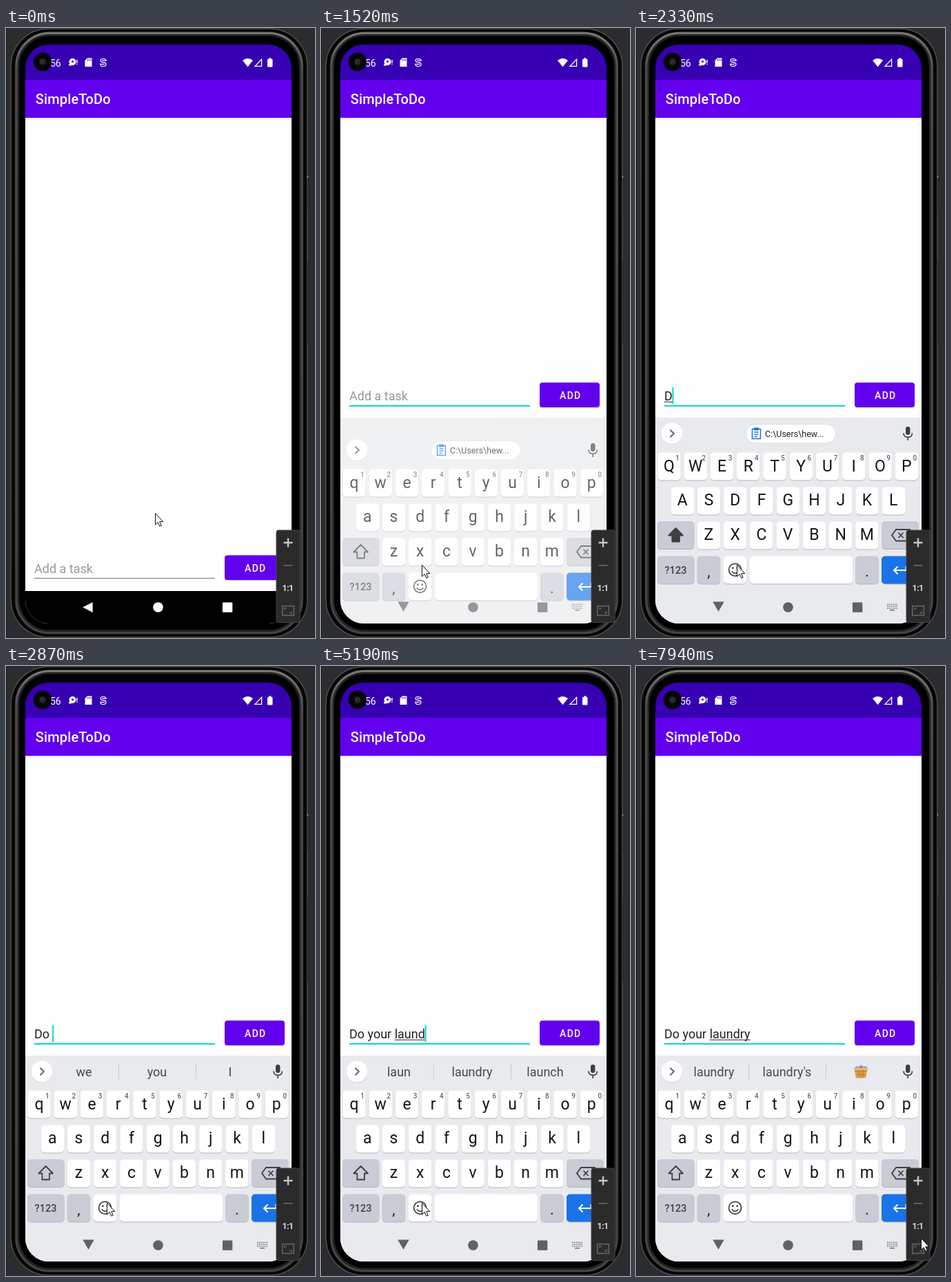
Recreate the animation shown at these times as an HTML page. Size 448 by 883 pixels, loop 8000 ms.

```html
<!DOCTYPE html>
<html lang="en">
<head>
<meta charset="utf-8">
<title>SimpleToDo</title>
<style>
html, body { margin: 0; width: 100%; height: 100%; overflow: hidden; background: #2b2c2f; }
svg { display: block; width: 448px; height: 883px; }
text { font-family: Roboto, sans-serif; white-space: pre; }
.mid { text-anchor: middle; }
</style>
</head>
<body>
<svg id="stage" viewBox="0 0 448 883" xmlns="http://www.w3.org/2000/svg"></svg>
<script>
const LOOP = 8000;
const stage = document.getElementById('stage');
const rect = (x, y, w, h, fill, r = 0, more = '') =>
  `<rect x="${x}" y="${y}" width="${w}" height="${h}" rx="${r}" fill="${fill}" ${more}/>`;
const circle = (x, y, r, fill, more = '') => `<circle cx="${x}" cy="${y}" r="${r}" fill="${fill}" ${more}/>`;
const path = (d, fill, more = '') => `<path d="${d}" fill="${fill}" ${more}/>`;
const line = (d, color, w = 1.6, more = '') => path(d, 'none', `stroke="${color}" stroke-width="${w}" ${more}`);
const label = (x, y, size, fill, s, more = '') =>
  `<text x="${x}" y="${y}" font-size="${size}" fill="${fill}" ${more}>${s}</text>`;
const center = (x, y, size, fill, s, more = '') => label(x, y, size, fill, s, 'class="mid" ' + more);
const group = (id, body, more = '') => `<g id="${id}" ${more}>${body}</g>`;

function phone() {
  const ring = (x, y, r, fill, stroke, w = 1) =>
    rect(x, y, 444 - 2 * x, 883 - 2 * y, fill, r, `stroke="${stroke}" stroke-width="${w}"`);
  return rect(0, 0, 448, 883, '#2b2c2f') + rect(0, 0, 1, 883, '#1d1e20') +
    rect(434, 213, 4, 57, '#161616', 1) + rect(436, 214, 2, 3, '#d0d0d0') +
    rect(434, 335, 4, 122, '#0a0a0a', 1) +
    ring(7.2, 1.2, 54, '#060606', '#565656', 1.2) +
    ring(15, 7.5, 48, '#000', 'url(#metal)', 3.6) +
    ring(18, 10.5, 45, '#000', '#242424', 2.4);
}

function statusBar() {
  const w = '#fff';
  return rect(28, 24, 386, 51, '#3700b3') +
    label(64, 55.5, 14, w, '56') +
    circle(53, 49, 13.3, '#050505') + circle(53, 49, 6, '#121213') +
    circle(53, 49, 3, '#0c0d10', 'stroke="#4c4e52" stroke-width="1"') + circle(52.6, 48.6, 0.9, '#888') +
    circle(96.5, 49, 5, w) + circle(96.5, 48.5, 1.6, '#3700b3') + rect(91, 52, 4, 2.4, w, 1) +
    rect(102.3, 46, 1.4, 4.6, w) + rect(102.3, 51.6, 1.4, 1.4, w) +
    path('M118 43.5H124.5V56H114.5V47Z', w) + line('M118.5 45v2.5M120.7 45v2.5M122.8 45v2.5', '#3700b3', 0.9) +
    line('M145 47Q145 44.5 141 44.5T137 47Q137 49.5 141 49.7T145 52.5Q145 55.5 141 55.5T137 53M139 47.2H146M136 52.4H143', w, 1.2) +
    path('M343 47Q350.5 41 358 47L350.5 56.3Z', w) +
    line('M361 55.4H370.6V45.4Z', w, 1.3) +
    rect(379, 45, 7.5, 11.5, w, 1) + rect(381, 43.5, 3.5, 2.5, w);
}

function toolbar() {
  return rect(392, 727, 34, 133.5, '#2b2b2b', 3, 'stroke="#444" stroke-width="1"') +
    line('M402.5 745H415.5M409 738.5V751.5', '#c4c6c8', 2.4) +
    line('M402.5 778H415.5', '#5c5e60', 2) +
    center(408.4, 814.6, 13, '#d0d2d4', '1:1', 'font-weight="700" letter-spacing="-.7"') +
    rect(400.7, 836.7, 16.6, 13.6, 'none', 0, 'stroke="#626466" stroke-width="1.6"') +
    line('M404 842.5V840H407M411 847H414V844.5', '#626466', 1.4);
}

function keyboardIcon(color) {
  let s = '';
  for (let r = 0; r < 3; r++)
    for (let c = 0; c < 6; c++) s += rect(364 + c * 2.7, 833.7 + r * 2.8, 1.4, 1.4, color);
  return s + rect(368, 842, 7, 1.3, color);
}

const navShapes = c => circle(220.5, 838.5, 7.3, c) + rect(313.9, 831.4, 14.4, 14.4, c, 1);
const key = (x, y, w, fill = '#fff') => rect(x, y + 1, w, 40, '#b3b6bb', 5) + rect(x, y, w, 40, fill, 5);

function keys() {
  const gray = '#c9ccd4', ink = '#3c4043', step = 38.25;
  let caps = '', s = '';
  [['qwertyuiop', 48], ['asdfghjkl', 67.3], ['zxcvbnm', 105.4]].forEach(([row, x0], r) => {
    [...row].forEach((ch, i) => {
      const x = x0 + i * step;
      caps += key(x - 16.7, 614.5 + r * 50, 33.4) + center(x, 641.6 + r * 49.7, 23, '#151515', ch);
      if (!r) s += center(x + 12, 625.5, 10, '#5f6368', (i + 1) % 10, 'font-weight="500"');
    });
  });
  return group('caps', caps) + s +
    key(31, 714, 53.5, gray) + key(356, 714, 54, gray) +
    path('M57.7 724L68 734.5H63V743.5H52.4V734.5H47.4Z', 'none', 'id="shift" stroke="#3c4043" stroke-width="1.8" stroke-linejoin="round"') +
    line('M377 726H397V742.5H377L371 734.2ZM380.5 730.5L387.5 738M387.5 730.5L380.5 738', ink, 1.8) +
    key(31, 764.5, 53.5, gray) + key(88.8, 764.5, 33.4, gray) + key(127, 764.5, 33.4) +
    key(165, 764.5, 149, '#fff') + key(318.3, 764.5, 33.4, gray) + key(356, 764.5, 54, '#1a73e8') +
    center(57.5, 790, 14.5, ink, '?123', 'font-weight="500"') +
    center(105.5, 794, 22, '#222', ',') + center(335, 794, 22, '#222', '.') +
    circle(143.6, 784.3, 9, 'none', 'stroke="#3c4043" stroke-width="1.7"') +
    circle(140.4, 781.7, 1.4, ink) + circle(146.8, 781.7, 1.4, ink) +
    line('M139 786.3Q140.3 789.4 143.6 789.4T148.2 786.3', ink, 1.6) +
    line('M391.5 779V785H374.5M379.5 779.5L374 785L379.5 790.5', '#fff', 2);
}

const clipboard = (x, y, c) =>
  line(`M${x - 6} ${y - 6.5}H${x + 6}V${y + 7.5}H${x - 6}ZM${x - 3} ${y - 2}H${x + 3}M${x - 3} ${y + 1.2}H${x + 3}M${x - 3} ${y + 4.4}H${x + 1}`, c, 1.5) +
  rect(x - 3.5, y - 8.5, 7, 4, c, 1);

function gear(x, y, c) {
  let s = '';
  for (let i = 0; i < 4; i++) s += rect(x - 2.2, y - 8.6, 4.4, 17.2, c, 0.8, `transform="rotate(${i * 45} ${x} ${y})"`);
  return s + circle(x, y, 6.4, c) + circle(x, y, 2.9, '#e8eaed');
}

function basket() {
  return path('M317 583Q318 577 323 580Q327 575 330 580Q335 577 335 583Z', '#7fb4dd') +
    path('M323 581Q326 576 330 583Z', '#e9655b') +
    path('M316.5 583H335.5L333 596.5H319Z', '#e7a24c') +
    line('M317 587H335M318 591.5H334M322 584L323 596M326 584V596M330 584L329 596', '#b87630', 1) +
    rect(315.5, 582, 21, 2.6, '#f1bd70', 1);
}

function strip() {
  const c = '#5f6368', divider = x => rect(x, 576, 1, 22, '#c6c8cc');
  const dots = [331.5, 338.5, 345.5].map(x => circle(x, 587, 2, c)).join('');
  return circle(52, 588, 15.6, '#cfd1d5') + circle(52, 587, 15.4, '#fff') +
    line('M49.5 581.8L55 587L49.5 592.2', c, 1.9, 'id="chevron"') +
    rect(391, 577, 6.4, 12, '#3c4043', 3.2) + line('M388 586.5Q388 592.3 394.2 592.3T400.4 586.5M394.2 592V597', '#3c4043', 1.7) +
    group('chip', rect(159.5, 573.5, 130, 27.5, '#fff', 13.7, 'stroke="#dadce0"') +
      clipboard(174.5, 587, '#1a73e8') + label(187, 591.6, 12.5, '#222', 'C:\\Users\\hew...')) +
    group('words', divider(163) + divider(275) +
      [113, 219, 325].map((x, i) => center(x, 594, 18, '#46494d', '', `id="word${i}"`)).join('')) +
    group('basket', basket()) +
    group('tools', line('M97 579.5H107Q110 579.5 110 582.5V589L104.5 594.5H97Q94.5 594.5 94.5 592V582Q94.5 579.5 97 579.5ZM110 589H104.5V594.5', c, 1.6) +
      circle(99.5, 584.5, 1.2, c) + circle(105, 584.5, 1.2, c) + line('M98.5 588Q102 591.5 105.5 588', c, 1.4) +
      center(157.5, 591.8, 14, c, 'GIF', 'font-weight="800" letter-spacing=".4"') +
      clipboard(214, 587, c) + gear(270, 587, c) + divider(303) + dots);
}

function row() {
  return rect(317, 514.5, 87, 36, '#bbb', 4, 'opacity=".6"') + rect(317, 513.2, 87, 35.8, '#6200ee', 4) +
    center(361.8, 537, 14, '#fff', 'ADD', 'font-weight="500" letter-spacing="1.25"') +
    rect(41, 546, 262, 1, '#777', 0, 'id="base"') +
    label(41, 539, 18, '#222', '', 'id="entry"') +
    rect(0, 540.7, 0, 1, '#222', 0, 'id="under"') + rect(41, 520, 2, 24, '#03dac5', 0, 'id="caret"');
}

stage.innerHTML =
  `<defs><clipPath id="screen"><rect x="28" y="24" width="386" height="838" rx="34"/></clipPath>
  <linearGradient id="metal" x2="0" y2="1"><stop stop-color="#777"/><stop offset=".06" stop-color="#4c4c4c"/><stop offset="1" stop-color="#444"/></linearGradient>
  <linearGradient id="drop" x2="0" y2="1"><stop stop-color="#000" stop-opacity=".1"/><stop offset="1" stop-color="#000" stop-opacity="0"/></linearGradient></defs>` +
  phone() +
  group('app', statusBar() + rect(28, 75, 386, 55, '#6200ee') + rect(28, 130, 386, 732, '#fefefe') +
    rect(28, 130, 386, 4, 'url(#drop)') +
    label(42.7, 110.3, 20, '#fff', 'SimpleToDo', 'font-weight="500" letter-spacing=".15"') +
    group('nav', rect(28, 815, 386, 47, '#000') +
      path('M111.2 838.5L125.6 831.2V845.9Z', '#fff') + navShapes('#fff') + group('imeIcon', keyboardIcon('#fff'))) +
    group('row', row()) +
    group('ime', rect(28, 564, 386, 298, '#e8eaed') + group('panel', strip() + keys()) +
      path('M111.3 830.5H127.7L119.5 844.7Z', '#5f6166') + navShapes('#5f6166') + keyboardIcon('#5f6166')),
    'clip-path="url(#screen)"') +
  toolbar() +
  path('M.5 .5V17L4.3 13.6L6.8 19.2L9.2 18.2L6.8 12.6H11.8Z', '#fff', 'id="pointer" stroke="#111" stroke-width="1" stroke-linejoin="round"');

const el = {};
stage.querySelectorAll('[id]').forEach(n => el[n.id] = n);
const set = (n, props) => { for (const k in props) n.setAttribute(k, props[k]); };
const show = (n, on) => { n.style.display = on ? '' : 'none'; };

const pen = document.createElement('canvas').getContext('2d');
const widthOf = s => { pen.font = '18px Roboto, sans-serif'; return pen.measureText(s).width; };

// under: index where the composing underline starts, -1 for none
const start = { text: '', under: -1, words: '', caret: 0, focus: 0, icon: 0, ime: 0, caps: 0, tools: 0, wrap: 0, at: [216, 702] };
const steps = [
  [120, { at: [191, 743] }],
  [260, { at: [167, 760] }],
  [400, { at: [154, 770] }],
  [520, { at: [148, 776] }],
  [640, { at: [146, 777], focus: 1 }],
  [760, { caret: 1 }],
  [1140, { caret: 0, icon: 1 }],
  [1520, { ime: 0.65 }],
  [1770, { ime: 1, caret: 1 }],
  [2180, { caps: 1, caret: 0 }],
  [2330, { text: 'D', under: 0, caret: 1 }],
  [2450, { caps: 0 }],
  [2600, { text: 'Do', words: "Do,Don't,Does" }],
  [2870, { text: 'Do ', under: -1, words: 'we,you,I' }],
  [3000, { text: 'Do y', under: 3, words: 'y,you,I' }],
  [3250, { text: 'Do yo', words: 'yo,you,yo' }],
  [3390, { text: 'Do you' }],
  [3520, { words: 'you,your,yours' }],
  [3660, { text: 'Do your', words: "your,you're,yourself" }],
  [3800, { text: 'Do your ', under: -1, words: 'own,best,job' }],
  [4190, { text: 'Do your l', under: 8, words: 'l,like,love' }],
  [4310, { text: 'Do your la', words: 'la,last,late' }],
  [4430, { text: 'Do your laun', words: 'lau,laugh,last' }],
  [4690, { words: 'laun,laundry,launch' }],
  [5190, { text: 'Do your laund' }],
  [5340, { text: 'Do your laundr', words: 'laund,laundry,laundromat' }],
  [5490, { text: 'Do your laundry', words: 'laundr,laundry,laundromat' }],
  [5740, { words: "laundry,laundry's,*" }],
  [5860, { wrap: 1 }],
  [6130, { under: -1 }],
  [6250, { tools: 1 }],
  [6650, { caret: 0 }],
  [7180, { caret: 1 }],
  [7300, { wrap: 0, under: 8 }],
  [7420, { tools: 0 }],
  [7820, { at: [320, 801], caret: 0 }],
  [7940, { at: [413, 828] }]
];

function draw(t) {
  const s = Object.assign({}, start);
  for (const [ms, change] of steps) if (t >= ms) Object.assign(s, change);

  set(el.row, { transform: `translate(0 ${s.ime ? 0 : 250})` });
  set(el.base, s.focus ? { height: 2, fill: '#03dac5' } : { height: 1, fill: '#777' });
  el.entry.textContent = s.text || 'Add a task';
  set(el.entry, { fill: s.text ? '#222' : '#999', y: s.wrap ? 518.5 : 539 });

  const end = 41 + widthOf(s.text);
  const from = 41 + widthOf(s.text.slice(0, Math.max(0, s.under)));
  show(el.under, s.under >= 0);
  set(el.under, { x: from, width: Math.max(0, end - from), y: s.wrap ? 520.2 : 540.7 });
  show(el.caret, s.caret);
  set(el.caret, s.wrap ? { x: 41, y: 523, height: 21 } : { x: s.text ? end - 0.3 : 41, y: 520, height: 24 });

  show(el.nav, !s.ime);
  show(el.imeIcon, s.icon);
  show(el.ime, s.ime);
  set(el.ime, { opacity: s.ime });
  set(el.panel, { transform: `translate(0 ${s.ime === 1 ? 0 : 24})` });
  el.caps.style.textTransform = s.caps ? 'uppercase' : 'none';
  set(el.shift, { fill: s.caps ? '#3c4043' : 'none' });

  const words = s.words.split(',');
  show(el.chip, !s.words);
  show(el.words, s.words && !s.tools);
  show(el.basket, words[2] === '*' && !s.tools);
  show(el.tools, s.tools);
  for (let i = 0; i < 3; i++) el['word' + i].textContent = words[i] && words[i] !== '*' ? words[i] : '';
  set(el.chevron, { transform: s.tools ? 'rotate(180 52 587)' : '' });
  set(el.pointer, { transform: `translate(${s.at})` });
}

const t0 = performance.now();
function tick() {
  draw((performance.now() - t0) % LOOP);
  requestAnimationFrame(tick);
}
tick();
</script>
</body>
</html>
```
